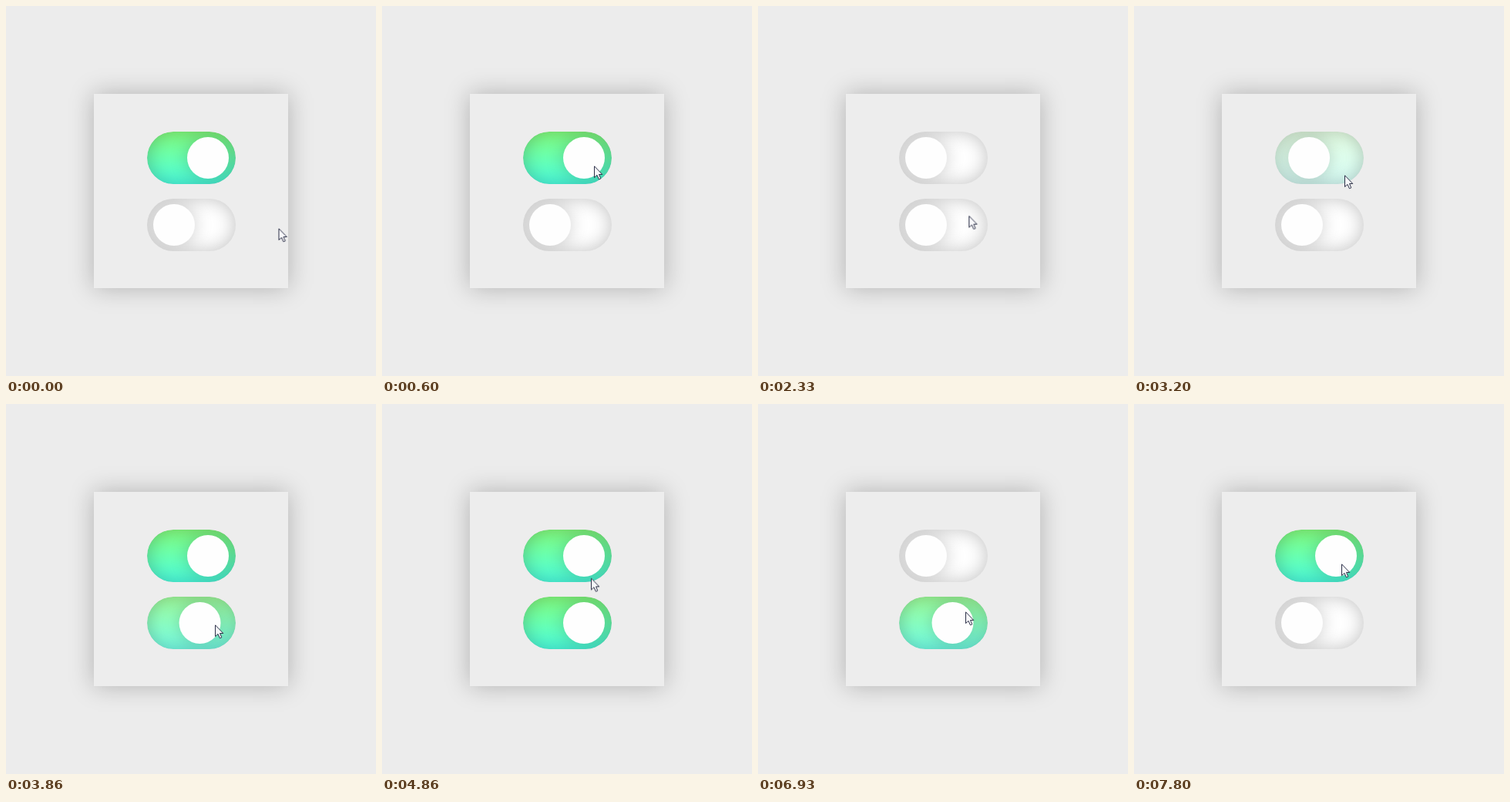
An HTML page that plays this animation: 480 by 480 pixels, repeating every 8000 ms.

```html
<!DOCTYPE html>
<html lang="en">
<head>
<meta charset="utf-8">
<title>Toggle switches</title>
<style>
  @property --on {
    syntax: "<number>";
    inherits: true;
    initial-value: 0;
  }

  html, body {
    margin: 0;
    width: 100%;
    height: 100%;
    overflow: hidden;
    background: #ececec;
  }

  .card {
    position: absolute;
    left: 114px;
    top: 114px;
    width: 252px;
    height: 252px;
    background: #ededed;
    box-shadow: 0 0 30px rgba(0, 0, 0, .25);
  }

  .toggle {
    position: absolute;
    left: 183px;
    width: 115px;
    height: 68px;
    border-radius: 34px;
    overflow: hidden;
    background: #fff;
    box-shadow: inset 0 0 24px rgba(0, 0, 0, .24);
    animation: 8s infinite ease;
  }
  .top { top: 163px; animation-name: top; }
  .bottom { top: 250px; animation-name: bottom; }

  .toggle::before {
    content: "";
    position: absolute;
    inset: 0;
    border-radius: inherit;
    background: linear-gradient(#84ff80, #4dffe0);
    box-shadow: inherit;
    opacity: var(--on);
  }

  .knob {
    position: absolute;
    left: 8px;
    top: 7px;
    width: 54px;
    height: 54px;
    border-radius: 50%;
    background: #fefefe;
    box-shadow: 0 0 24px rgba(0, 0, 0, .2);
    transform: translateX(calc(44px * var(--on)));
  }

  .cursor {
    position: absolute;
    left: 0;
    top: 0;
    overflow: visible;
    animation: move 8s infinite ease-in-out;
  }

  @keyframes top {
    0%, 15.1% { --on: 1; }
    18.9%, 39.4% { --on: 0; }
    43.15%, 64.4% { --on: 1; }
    68.15%, 92.5% { --on: 0; }
    96.25%, 100% { --on: 1; }
  }

  @keyframes bottom {
    0%, 46.6% { --on: 0; }
    50.35%, 86.05% { --on: 1; }
    89.8%, 100% { --on: 0; }
  }

  @keyframes move {
    0%, .3% { transform: translate(353.5px, 288px); }
    7.5%, 20.9% { transform: translate(275px, 207px); }
    32.5%, 34.2% { transform: translate(273px, 285px); }
    35.8%, 40% { transform: translate(273px, 219px); }
    44.1%, 59.2% { transform: translate(271px, 286px); }
    61.6%, 65% { transform: translate(271px, 209px); }
    67.5%, 86.7% { transform: translate(269px, 269px); }
    90.8%, 100% { transform: translate(269px, 207px); }
  }
</style>
</head>
<body>
  <div class="card"></div>
  <div class="toggle top"><div class="knob"></div></div>
  <div class="toggle bottom"><div class="knob"></div></div>
  <svg class="cursor" width="12" height="19">
    <path d="M.5 .8V15.6L4 12.4L6.4 17.8L8.8 16.8L6.5 11.5H10.8Z"
          fill="#f8f8fa" stroke="#2c3048" stroke-linejoin="round"/>
  </svg>
<script>
  // Advance the CSS animations in even steps of 15 per second.
  const LOOP = 8000, STEP = 1000 / 15, SLACK = 7;
  const anims = document.getAnimations();
  const start = performance.now();
  anims.forEach(a => a.pause());

  function tick() {
    const t = (performance.now() - start) % LOOP;
    const now = Math.floor((t + SLACK) / STEP) * STEP % LOOP;
    anims.forEach(a => { a.currentTime = now; });
    requestAnimationFrame(tick);
  }
  tick();
</script>
</body>
</html>
```
